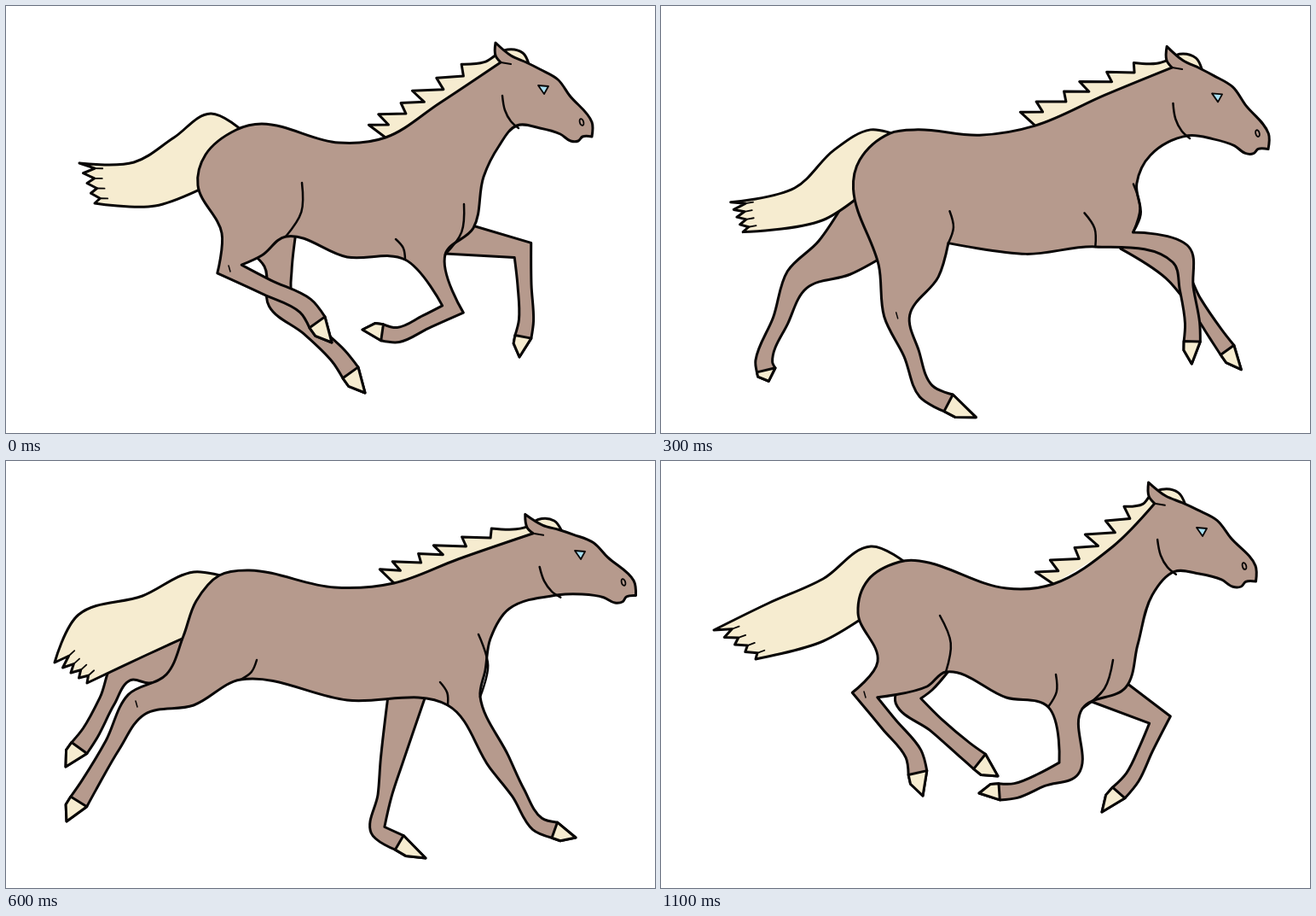
Animation, 761 px wide and 500 px high, one loop 1.2 s. Source, as an HTML page with a canvas:

```html
<!DOCTYPE html>
<html lang="en">
<head>
<meta charset="utf-8">
<title>Galloping horse</title>
<style>
html, body { margin: 0; width: 100%; height: 100%; overflow: hidden; background: #fff; }
canvas { display: block; }
</style>
</head>
<body>
<canvas id="stage" width="761" height="500"></canvas>
<script>
const ctx = document.getElementById('stage').getContext('2d');
const COAT = '#b69a8d', CREAM = '#f6ecd0', BLUE = '#a9e0f2', INK = '#080606';
const STEP = 100, STEPS = 12, HIND = 15, FORE = 13;
const poses = {};
const points = text => text.split(' ').map(p => p.split(',').map(Number));

// A pose holds joints only: legs are joint, fetlock, toe; outlines grow from them.
function pose(step, parts) {
  poses[step] = {};
  for (const name in parts) poses[step][name] = points(parts[name]);
}

pose(0, {
  rump: '270,145 234,174 225,210 253,266', hind: '262,308 351,351 382,394',
  belly: '300,292 328,270 400,294 468,297', fore: '524,355 460,385 418,379',
  chest: '515,291 548,260 560,200 578,164', face: '630,97 675,136',
  back: '508,114 445,154 390,160 300,138', creases: '347,207 457,273 537,232',
  tail: '240,126 197,154 150,183 86,184 104,231 175,234',
  farHind: '322,345 390,410 421,453', farThigh: '275,280 303,305 335,310 340,265',
  farFore: '606,286 610,368 602,411', farArm: '515,290 540,255'
});
pose(2, {
  rump: '273,142 236,172 231,205 284,298', hind: '333,360 388,438 447,472',
  belly: '356,310 357,277 430,290 496,282', fore: '590,300 575,378 556,417',
  chest: '546,270 563,250 564,203 578,167', face: '644,99 691,140',
  back: '510,107 440,139 370,150 300,139', creases: '354,228 490,243 561,215',
  tail: '252,133 206,160 160,201 85,209 96,250 190,247',
  farHind: '197,337 197,440 249,472', farThigh: '245,190 216,282 260,318 310,270',
  farFore: '622,280 664,350 675,396', farArm: '560,288 555,250'
});
pose(4, {
  rump: '262,154 229,186 218,222 219,300', hind: '205,351 214,445 260,475',
  belly: '280,318 309,275 420,290 519,284', fore: '616,296 653,372 671,419',
  chest: '557,264 560,240 553,212 572,181', face: '660,113 708,156',
  back: '530,104 440,143 380,153 300,148', creases: '319,248 500,247 545,204',
  tail: '236,153 195,174 145,218 76,246 97,275 185,250',
  farHind: '138,298 72,380 30,399', farThigh: '225,215 165,266 190,304 245,290',
  farFore: '564,341 609,422 656,458', farArm: '505,280 555,285'
});
pose(6, {
  rump: '250,134 223,164 208,205 188,250', hind: '153,285 97,380 71,422',
  belly: '220,286 275,256 400,280 518,286', fore: '578,352 623,425 668,441',
  chest: '556,276 562,245 568,208 590,173', face: '673,109 724,142',
  back: '530,115 455,143 385,148 285,128', creases: '294,233 509,259 554,203',
  tail: '220,130 160,158 85,180 57,236 95,260 165,227',
  farHind: '138,244 99,318 70,358', farThigh: '215,200 165,226 168,260 225,240',
  farFore: '452,352 436,432 492,465', farArm: '448,275 492,275'
});
pose(8, {
  rump: '260,112 226,139 214,180 216,218', hind: '161,236 140,328 101,367',
  belly: '258,268 299,240 385,279 469,296', fore: '471,362 452,435 495,466',
  chest: '521,283 543,255 560,205 598,160', face: '662,102 715,137',
  back: '550,108 457,149 400,149 300,112', creases: '308,193 475,253 535,245',
  tail: '234,106 175,136 95,150 64,200 89,232 180,212',
  farHind: '197,236 195,322 188,371', farThigh: '240,205 204,212 225,255 260,235',
  farFore: '427,351 363,384 319,400', farArm: '446,285 480,290'
});
pose(10, {
  rump: '278,114 238,136 221,178 239,237', hind: '207,255 234,348 229,395',
  belly: '306,262 321,243 385,279 444,294', fore: '449,366 386,401 345,424',
  chest: '483,302 540,275 554,222 582,163', face: '645,94 690,127',
  back: '527,112 455,149 395,150 305,114', creases: '320,181 453,249 521,242',
  tail: '243,97 190,134 120,156 52,178 106,222 185,207',
  farHind: '262,275 300,343 323,386', farThigh: '240,240 246,262 275,262 290,240',
  farFore: '518,344 452,393 408,401', farArm: '470,285 526,275'
});
pose(11, {
  rump: '280,118 243,139 231,178 254,235', hind: '239,274 296,343 307,392',
  belly: '312,264 334,247 405,277 454,288', fore: '478,360 416,386 373,389',
  chest: '494,290 545,265 559,215 576,157', face: '634,82 684,123',
  back: '530,100 460,144 405,149 303,117', creases: '327,181 463,250 530,233',
  tail: '246,100 190,138 125,167 62,198 111,232 190,211',
  farHind: '290,281 356,338 395,369', farThigh: '285,245 278,262 318,268 338,245',
  farFore: '585,303 553,370 517,411', farArm: '500,280 546,260'
});

// Offsets from the eye, for a nostril at GAZE.
const GAZE = [45, 39];
const HEAD = points('-31,43 -4,46 20,53 32,61 41,61 46,56 57,56 57,39 31,8 17,-11 -4,-23 -20,-31 -38,-39 -56,-54 -56,-39 -50,-31');
const JAW = points('-48,8 -45,25 -38,38 -29,46');
const FORELOCK = points('-42,-46 -24,-42 -17,-29');

// Steps without a pose of their own lie on a cubic through their neighbours.
function poseAt(step) {
  if (poses[step]) return poses[step];
  const [a, b, c, d] = [-3, -1, 1, 3].map(k => poses[(step + k + STEPS) % STEPS]);
  const between = {};
  for (const n in b)
    between[n] = b[n].map((p, i) => p.map((v, j) =>
      (9 * (v + c[n][i][j]) - a[n][i][j] - d[n][i][j]) / 16));
  return between;
}

const add = (p, d, k = 1) => [p[0] + d[0] * k, p[1] + d[1] * k];
const sub = (a, b) => add(a, b, -1);
const mix = (a, b, t) => add(a, sub(b, a), t);
const unit = v => {
  const len = Math.hypot(...v) || 1;
  return [v[0] / len, v[1] / len];
};

// Smooth line through the points; sharp turns and doubled points stay corners.
function trace(pts, closed) {
  const n = pts.length, at = i => pts[(i + n) % n];
  const tangent = i => {
    if (!closed && (i === 0 || i === n - 1)) return [0, 0];
    const u = unit(sub(at(i), at(i - 1))), v = unit(sub(at(i + 1), at(i)));
    return u[0] * v[0] + u[1] * v[1] < 0.35 ? [0, 0] : unit(add(u, v));
  };
  ctx.beginPath();
  ctx.moveTo(...pts[0]);
  for (let i = 0; i < n - (closed ? 0 : 1); i++) {
    const a = at(i), b = at(i + 1), k = Math.hypot(...sub(b, a)) / 3;
    ctx.bezierCurveTo(...add(a, tangent(i), k), ...add(b, tangent((i + 1) % n), -k), ...b);
  }
  if (closed) ctx.closePath();
}

function shape(pts, fill, closed) {
  trace(pts, closed);
  ctx.fillStyle = fill;
  ctx.fill();
  ctx.stroke();
}

function polygon(pts, fill) {
  shape(pts.flatMap(p => [p, p]), fill, true);
}

function line(pts, width) {
  ctx.lineWidth = width;
  trace(pts);
  ctx.stroke();
  ctx.lineWidth = 3;
}

// A crease bows forward between its two ends.
function crease(top, end) {
  const [x, y] = sub(end, top);
  line([top, add(mix(top, end, 0.5), [y, -x], 0.14), end], 2.5);
}

// Lower leg: down the rear side, round the hoof and up the front side.
function limb(root, [joint, fetlock, toe], size) {
  const crown = mix(fetlock, toe, 0.45);
  const chain = [root, joint, mix(joint, fetlock, 0.5), fetlock, crown, toe];
  const rear = [], front = [];
  [1, 0.62, 0.66, 0.74].forEach((w, i) => {
    const [a, b, c] = chain.slice(i, i + 3);
    const [x, y] = unit(add(unit(sub(b, a)), unit(sub(c, b))));
    rear.push(add(b, [-y, x], w * size));
    front.unshift(add(b, [y, -x], w * size));
  });
  const heel = add(rear.pop(), [0, 0]), brow = front.shift();
  const hoof = [heel, add(heel, sub(toe, crown), 0.4), toe, brow];
  return { outline: [...rear, ...hoof.flatMap(p => [p, p]), ...front], hoof };
}

function farLeg(joints, rear, front, size) {
  const leg = limb(mix(rear[rear.length - 1], front[0], 0.5), joints, size);
  shape([...rear, ...leg.outline, ...front], COAT);
  polygon(leg.hoof, CREAM);
}

function drawTail(p) {
  const [arch, top, outer, tip, end, under] = p.tail;
  const inward = unit(sub(mix(outer, under, 0.5), mix(tip, end, 0.5)));
  const edge = [tip], notches = [];
  for (let i = 1; i <= 4; i++) {
    const notch = add(mix(tip, end, (i - 0.5) / 4), inward, 6 + 10 / i);
    notches.push(notch);
    edge.push(notch, mix(tip, end, i / 4));
  }
  shape([add(p.rump[0], [8, 2]), arch, top, outer, ...edge, under, add(p.rump[1], [15, 30])], CREAM);
  notches.forEach(n => line([n, add(n, inward, 9)], 1.8));
}

// Tufts of varied length stand along the crest, swept backwards.
function drawMane(poll, [middle, withers], forelock) {
  const bow = sub(middle, mix(poll, withers, 0.5));
  const crest = t => add(mix(poll, withers, t), bow, 4 * t * (1 - t));
  const [dx, dy] = unit(sub(poll, withers)), out = [dy, -dx];
  const tufts = 6, pts = [withers];
  for (let i = 0; i < tufts; i++) {
    const t = 1 - i / tufts, length = 12 + 14 * (i * 0.618 % 1);
    pts.push(add(add(crest(t), out, 14), [-length, -3]));
    pts.push(add(crest(t - 0.08), out, 11));
  }
  shape([...pts, add(poll, out, 10), ...forelock], CREAM);
}

function draw(step) {
  const p = poseAt(step);
  ctx.fillStyle = '#fff';
  ctx.fillRect(0, 0, 761, 500);
  ctx.strokeStyle = INK;
  ctx.lineWidth = 3;
  ctx.lineCap = ctx.lineJoin = 'round';

  // Turn and scale the head so that it looks from eye to nostril.
  const [eye, nostril] = p.face, [gx, gy] = GAZE, [vx, vy] = sub(nostril, eye);
  const size = gx * gx + gy * gy;
  const c = (vx * gx + vy * gy) / size, s = (vy * gx - vx * gy) / size;
  const place = ([x, y]) => add(eye, [x * c - y * s, x * s + y * c]);
  const head = HEAD.map(place), poll = head[head.length - 1];

  farLeg(p.farHind, p.farThigh.slice(0, 2), p.farThigh.slice(2), HIND);
  farLeg(p.farFore, [p.farArm[0]], [p.farArm[1]], FORE);
  drawTail(p);
  drawMane(poll, p.back, FORELOCK.map(place));

  const [thigh, flank, , elbow] = p.belly;
  const hind = limb(mix(p.rump[3], thigh, 0.5), p.hind, HIND);
  const fore = limb(mix(elbow, p.chest[0], 0.5), p.fore, FORE);
  shape([...p.rump, ...hind.outline, ...p.belly, ...fore.outline, ...p.chest, ...head, ...p.back], COAT, true);
  polygon(hind.hoof, CREAM);
  polygon(fore.hoof, CREAM);

  [flank, elbow, p.chest[0]].forEach((end, i) => crease(p.creases[i], end));
  line(JAW.map(place), 2.5);
  line([poll, add(poll, [12, 2])], 2);
  line([add(p.hind[0], [-1, -4]), add(p.hind[0], [1, 3])], 1.5);

  ctx.lineWidth = 1.8;
  polygon([[-6, -4], [6, -3], [1, 6]].map(d => add(eye, d)), BLUE);
  ctx.beginPath();
  ctx.ellipse(...nostril, 2.2, 4, -0.3, 0, 7);
  ctx.stroke();
}

const start = performance.now();
function frame() {
  draw(Math.floor((performance.now() - start) / STEP) % STEPS);
  requestAnimationFrame(frame);
}
frame();
</script>
</body>
</html>
```
